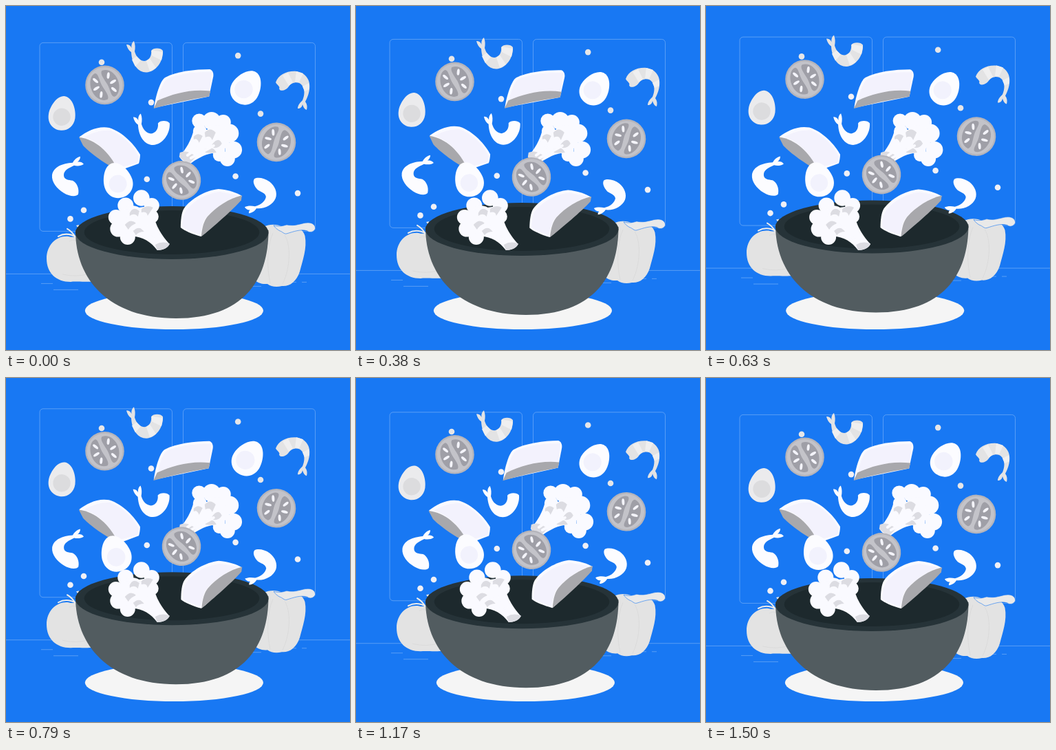
Write an HTML page that moves like this. It is 500x500 px and loops after 1.54 s.

```html
<!DOCTYPE html>
<html lang="en">
<head>
<meta charset="utf-8">
<title>Salad bowl</title>
<style>
html, body { margin: 0; width: 100%; height: 100%; overflow: hidden; background: #1878f3; }
svg { display: block; width: 100vw; height: 100vh; }
</style>
</head>
<body>
<svg viewBox="0 0 500 500">
  <defs>
    <path id="egg" d="M0-26C12-26 20.500-8 20.500 4C20.500 17 11 25 0 25C-11 25-20.500 17-20.500 4C-20.500-8-12-26 0-26Z"/>
    <path id="prawn" d="M182 67C183 85 192 96.500 204 96.500C218 96 229 80 228 65C225 60.500 214 60.500 211 65C212 73 208 79 201 80C193 79 189 73 187 66C188 61 188 56 186 51C183 53 182 57 182.500 61C181 57 178 56 175 56C176 61 179 65 182 67Z"/>
    <path id="lobe" d="M4-21C14-21 20.500-11 20.500 0C20.500 11 14 21 7 21C2 20 5 10 4 1C3-7-1-18 4-21Z"/>
    <g id="half">
      <use href="#lobe" fill="#9f9fa7"/>
      <g fill="#f4f4fa">
        <ellipse cx="10" cy="-11" rx="2" ry="4.800" transform="rotate(28 10 -11)"/>
        <ellipse cx="13" cy="0" rx="2" ry="5" transform="rotate(80 13 0)"/>
        <ellipse cx="10" cy="11" rx="2" ry="4.800" transform="rotate(-28 10 11)"/>
      </g>
    </g>
    <g id="slice">
      <circle r="28.300" fill="#b4b4bb"/>
      <circle r="26" fill="#c3c3c9"/>
      <use href="#half"/>
      <use href="#half" transform="rotate(180)"/>
    </g>
  </defs>

  <rect width="500" height="500" fill="#1878f3"/>

  <g class="bob">
    <g fill="none" stroke="#69a8f7" stroke-width=".8">
      <rect x="49" y="53.500" width="192.500" height="274" rx="5"/>
      <rect x="257.500" y="53.500" width="192" height="274" rx="5"/>
      <path d="M0 389.500H500M51 403.500H68M69 412.500H105M357 407.500H371M414 401.500H422M430 401.500H437"/>
    </g>
    <path fill="#e3e3e3" d="M59 367C59 347 74 333 91 335C100 338 114 331 130 340V400C115 402 103 400 94 401C73 401 59 388 59 367Z"/>
    <path fill="none" stroke="#ededed" stroke-width="2" stroke-linecap="round" d="M76 335Q88 328 102 336M89 324Q95 327 101 336"/>
    <path fill="none" stroke="#d9d9d9" stroke-width=".8" d="M82 390Q102 395 122 389M92 342Q101 337 108 346"/>
    <path fill="#e8e8e8" d="M102 319L106 318L105 323Z"/>
    <path fill="#e3e3e3" d="M364 330C373 317 390 315 402 321C413 316 430 320 434.500 334C438 352 431 370 427 386C422 401 412 408 401 407C393 409 385 408 380 404C372 405 365 402 360 397Z"/>
    <path fill="#e9e9e9" stroke="#1878f3" stroke-width=".6" d="M389 319C396 321 402 320 408 318C421 321 430 315 439 315C446 315 450 319 449.500 324C447 329 441 330 438 327C428 324 418 328 408 331C404 332 402 328 398 327C394 325 391 322 389 319Z"/>
    <path fill="none" stroke="#d9d9d9" stroke-width=".8" d="M405 333C414 346 414 380 402 404M388 330C379 350 379 380 384 403"/>
  </g>

  <ellipse class="shake" cx="244.600" cy="442.800" rx="129.600" ry="27.300" fill="#f5f5f5"/>

  <g class="bob">
    <path fill="#525c60" d="M101 326C100.500 398 150 454 247 454S381.500 400 381.500 326Z"/>
    <ellipse cx="241.200" cy="329.500" rx="140.300" ry="38.500" fill="#263338"/>
    <ellipse cx="241" cy="329" rx="127.300" ry="32" fill="#1d292d"/>
    <g id="dots"></g>
    <g transform="translate(81.800 156.500) rotate(9)">
      <use href="#egg" transform="scale(.95 .98)" fill="#ebebed"/>
      <circle cy="5" r="12.700" fill="#dcdcde"/>
    </g>
    <use href="#prawn" fill="#e3e3e4"/>
    <path fill="#efeff0" d="M212 72L226 79L228 67L212 64ZM204 80L209 95L218 90L209 76ZM190 73L183 78L188 88L196 79Z"/>
    <path fill="#e3e3e4" d="M392 111C396 100 408 94 422 95C436 97 443 108 441 121C440 129 437 135 435 139C438 143 438 147 437 151C434 150 432 147 431 143C430 147 428 149 424 149C424 144 428 140 431 137C434 130 435 121 430 115C425 109 415 111 411 117C407 123 398 125 397 120C399 117 394 115 392 111Z"/>
    <path fill="#efeff0" d="M402 101L410 97L417 111L411 116ZM422 95L432 98L426 111L420 110ZM440 112L441 121L434 124L431 117Z"/>
    <use href="#slice" transform="translate(143.500 115) rotate(-22)"/>
    <use href="#slice" transform="translate(393 198) rotate(24)"/>
  </g>

  <g class="wind">
    <path fill="#fafaff" d="M215 148C217 132 224 108 231 104C248 95 275 92 296 92C300 93 302 98 301 103L295 131.500Z"/>
    <path fill="#f3f2fd" d="M221 138C224 121 229 108 236 105C257 97 278 96 299 96L296 123C268 121 243 127 221 138Z"/>
    <path fill="#a8a8ac" d="M214.500 149L220 137.500C243 127 270 120 297 123.500L295 131.500C267 136 240 142 214.500 149Z"/>
    <path fill="#fafaff" d="M106.500 190.500C118 182 133 174 150 177C170 183 188 203 195 216C195 221 194 226 193 229C182 233 172 237 162 240Z"/>
    <path fill="#f3f2fd" d="M113 191C128 183 140 180 152 181C170 188 186 204 193 219L191 228L161 236C150 212 132 196 113 191Z"/>
    <path fill="#a8a8ac" d="M106 191C130 194 150 212 163 239C140 228 118 210 112 203Z"/>
    <path fill="#fafaff" d="M283.500 335C272 332 258 326 254 322C254 312 255 300 259 294C269 280 290 268 309 266C322 267 335 271 343 276L290 330Z"/>
    <path fill="#f3f2fd" d="M282 332C270 328 262 325 257 321C257 312 258 303 262 297C274 282 292 272 311 270L338 275C318 282 292 303 288 312Z"/>
    <path fill="#a8a8ac" d="M284 335C285 322 288 312 293 306C305 292 325 279 343 275L342 282C330 296 300 322 284 335Z"/>
    <g fill="#fcfcff">
      <use href="#prawn" x="9.800" y="105.500"/>
      <path d="M97 228C99 224 103 220 108 219C108 223 106 225 104 227C107 226 111 227 113 230C109 233 103 233 99 232C91 236 84 239 84 246C84 253 91 253 97 254C103 257 107 266 105 274C102 278 92 277 84 272C74 266 66 256 67 246C69 234 82 229 97 228Z"/>
      <path d="M361 251C366 248 376 250 383 255C391 261 395 271 392 279C388 289 376 295 364 294C361 299 356 301 353 301C353 298 354 297 355 296C352 297 349 295 347 292C351 290 357 290 362 291C371 289 377 283 378 277C377 271 370 270 366 267C361 262 358 255 361 251Z"/>
    </g>
  </g>

  <g class="beat">
    <g transform="translate(347.500 120) rotate(32)">
      <use href="#egg" fill="#fcfcff"/>
      <circle cx="-2" cy="4" r="13" fill="#f2f2fd"/>
    </g>
    <g transform="translate(164 252.500) rotate(-18)">
      <use href="#egg" fill="#fcfcff"/>
      <circle cx="-1" cy="4.500" r="12.700" fill="#f2f2fd"/>
    </g>
  </g>

  <g class="shake">
    <g fill="#fafaff">
      <g id="headA"></g>
      <path d="M273 180L320 180L318 222L300 214C288 216 276 223 267 230C261 229 255 224 252 219C262 208 270 194 273 180Z"/>
    </g>
    <g fill="#dcdce2">
      <path d="M253 213Q264 208 276 219L267 229Q257 225 252 219Z"/>
      <path d="M273 190Q279 183 286 189L281 199Q278 191 273 194ZM289 184Q297 175 305 184L300 195Q297 187 290 191ZM300 201Q309 189 314 200Q308 209 299 205ZM289 208Q301 202 306 213Q298 214 290 213Z"/>
    </g>
    <path fill="none" stroke="#fafaff" stroke-width="4" stroke-linecap="round" d="M264 217Q280 207 287 192M269 221Q288 211 302 203"/>
    <g fill="#fafaff">
      <g id="headB"></g>
      <path d="M172 296L214 290C213 312 224 331 238 346C235 352 228 355 220 355C211 343 199 335 184 335Z"/>
    </g>
    <g fill="#dcdce2">
      <path d="M217 347Q227 341 238 345.500Q235 354 220 355Z"/>
      <path d="M180 301Q185 290 194 298L192 306Q187 300 180 305ZM197 295Q206 288 214 293L206 305Q205 298 197 300ZM173 318Q181 308 190 316Q182 318 178 325ZM185 327Q194 318 201 328Q193 328 189 333Z"/>
    </g>
    <path fill="none" stroke="#fafaff" stroke-width="4" stroke-linecap="round" d="M221 341Q207 322 203 303M217 344Q204 324 190 317"/>
  </g>

  <g class="bob">
    <use href="#slice" transform="translate(255 253.500) rotate(-40)"/>
  </g>
</svg>
<script>
const LOOP = 1540, STEP = LOOP / 37, CYCLE = 1500, LEAD = 30;
const all = name => [...document.querySelectorAll('.' + name)];
const parts = { bob: all('bob'), shake: all('shake'), wind: all('wind'), beat: all('beat') };

const circles = (id, list) => {
  document.getElementById(id).innerHTML = list
    .map(([x, y, r = 4.3, fill = '']) => `<circle cx="${x}" cy="${y}" r="${r}"${fill && ` fill="${fill}"`}/>`)
    .join('');
};
const pale = '#e6e6e8', light = '#f0f0f6';
circles('dots', [
  [139, 81.8, 4.3, pale], [337.2, 72.2, 4.3, pale], [370, 156.7, 4.3, pale],
  [211, 140.2, 4.3, light], [204.8, 251.8, 4.3, light], [333.6, 247.6, 4.3, light],
  [424, 272.2, 4.3, light], [113, 296.8, 4.3, light], [93.5, 309.5, 4.3, light]
]);
circles('headA', [
  [281, 167, 10.5], [299, 167, 13], [316, 169, 11], [325, 185, 13.5], [331, 209, 12.3],
  [322, 222, 11], [310, 217, 9], [282, 182, 10], [307, 192, 19]
]);
circles('headB', [
  [160, 307, 11], [163, 324, 11.5], [177, 336, 11], [174, 290, 11.5], [197, 279, 11.8],
  [212, 290, 11], [212, 306, 10], [183, 311, 21]
]);

// Linear interpolation through [position, value] pairs.
const track = (keys, p) => {
  const i = keys.findIndex(k => k[0] > p);
  const [a, u] = keys[i - 1], [b, v] = keys[i];
  return u + (v - u) * (p - a) / (b - a);
};
const BOB = [[0, 0], [.5, -10], [1, 0]];
const WIND = [[0, 0], [.25, 1], [.75, -1], [1, 0]];
const SHAKE = [[0, 0], [.1, -1], [.2, 2], [.3, -4], [.4, 4], [.5, -4], [.6, 4], [.7, -4], [.8, 2], [.9, -1], [1, 0]];
const BEAT = [[0, 1], [.1, 1.1], [.15, 1.09], [.2, 1], [.5, 1], [.6, 1.1], [.65, 1], [1, 1]];

const move = (name, value) => parts[name].forEach(el => el.setAttribute('transform', value));

function draw(ms) {
  const t = Math.floor((ms % LOOP + 1) / STEP) * STEP;
  const p = (t + LEAD) % CYCLE / CYCLE;
  const s = track(BEAT, p);
  move('bob', `translate(0 ${track(BOB, p) + .3})`);
  move('shake', `translate(${track(SHAKE, p)} 0)`);
  move('wind', `rotate(${track(WIND, p) * 1.1} 230 222)`);
  move('beat', `translate(255.5 186) scale(${s}) translate(-255.5 -186)`);
}

const start = performance.now();
function tick() {
  draw(performance.now() - start);
  requestAnimationFrame(tick);
}
tick();
</script>
</body>
</html>
```
